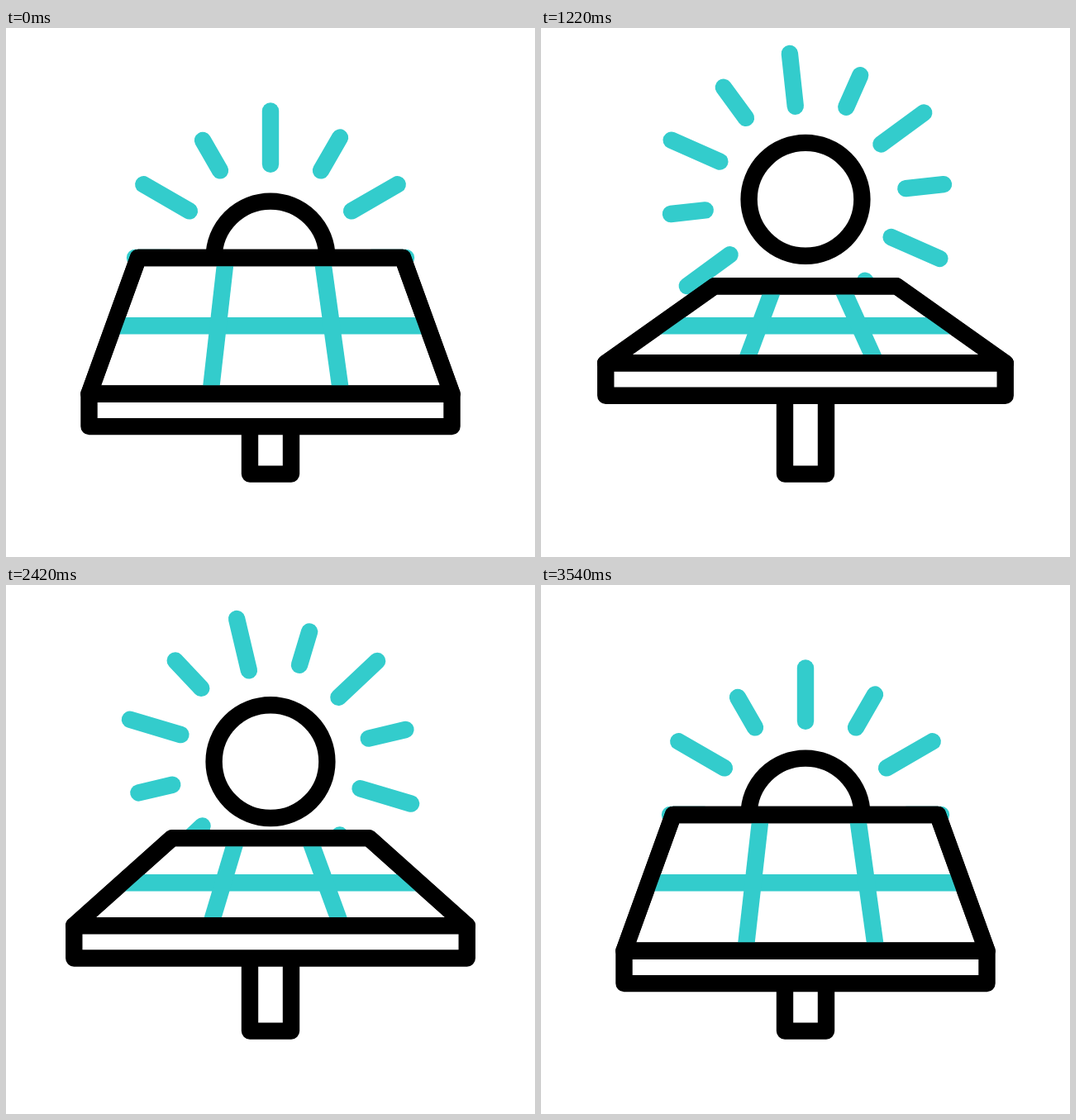
Animation, 640 px wide and 640 px high, one loop 3.6 s. Source, as an HTML page with a canvas:

```html
<!DOCTYPE html>
<html lang="en">
<head>
<meta charset="utf-8">
<title>Solar panel</title>
<style>
  html, body { margin: 0; width: 100%; height: 100%; overflow: hidden; background: #fff; }
  canvas { display: block; }
</style>
</head>
<body>
<canvas id="stage" width="640" height="640"></canvas>
<script>
const ctx = document.getElementById('stage').getContext('2d');
const LOOP = 3600, TEAL = '#33cccc', BLACK = '#000';
const mix = (a, b, k) => a + (b - a) * k;

// Cubic-bezier easing with control points (x1, 0) and (x2, 1).
function ease(t, start, end, x1, x2) {
  const x = (t - start) / (end - start);
  if (x <= 0) return 0;
  if (x >= 1) return 1;
  let lo = 0, hi = 1;
  for (let i = 0; i < 24; i++) {
    const u = (lo + hi) / 2, v = 1 - u;
    if (3 * u * v * v * x1 + 3 * u * u * v * x2 + u * u * u < x) lo = u; else hi = u;
  }
  return lo * lo * (3 - 2 * lo);
}

function shape(color, points, closed, fill) {
  ctx.beginPath();
  points.forEach(([x, y]) => ctx.lineTo(x, y));
  if (closed) ctx.closePath();
  if (fill) ctx.fill();
  ctx.strokeStyle = color;
  ctx.stroke();
}

function drawSun(y, angle) {
  ctx.save();
  ctx.translate(320, y);
  ctx.strokeStyle = BLACK;
  ctx.beginPath();
  ctx.arc(0, 0, 68.4, 0, 7);
  ctx.stroke();
  ctx.rotate(angle * Math.PI / 180);
  ctx.lineCap = 'round';
  for (let i = 0; i < 12; i++) {
    const long = i % 2 === 0;
    const outer = long ? 177.5 : i === 1 || i === 5 ? 168 : 164;
    shape(TEAL, [[0, long ? -113.3 : -122], [0, -outer]]);
    ctx.rotate(Math.PI / 6);
  }
  ctx.restore();
}

function drawPanel(p) {
  const backX = mix(160, 210.5, p), backY = mix(278, 312.7, p);
  const frontX = mix(100.5, 78, p), frontY = mix(442.8, 405, p), baseY = frontY + 39.3;
  const back = [[backX, backY], [640 - backX, backY]];
  const front = [[640 - frontX, frontY], [frontX, frontY]];
  const midY = 360.3, midX = mix(backX, frontX, (midY - backY) / (frontY - backY));

  ctx.fillStyle = '#fff';
  shape(BLACK, [[295, 420], [295, 539.6], [345, 539.6], [345, 420]]);
  shape(BLACK, [...back, ...front], true, true);
  shape(TEAL, [[midX, midY], [640 - midX, midY]]);
  shape(TEAL, [[mix(266, 282.2, p), backY], [247.3, frontY]]);
  shape(TEAL, [[mix(382.6, 363, p), backY], [405.5, frontY]]);
  shape(BLACK, [...back, ...front], true);
  shape(BLACK, [...front, [frontX, baseY], [640 - frontX, baseY]], true, true);
}

function draw(now) {
  const t = now % LOOP;
  const tilt = ease(t, 30, 1430, .32, .18) - ease(t, 2155, 3545, .32, .18);
  const rise = ease(t, 70, 1784, .415, .162) - ease(t, 2090, 3540, .36, .447);
  const spin = ease(t, 192, 1609, 1 / 3, 2 / 3) - ease(t, 1978, 3505, 1 / 3, 2 / 3);

  ctx.clearRect(0, 0, 640, 640);
  ctx.lineWidth = 20.4;
  ctx.lineJoin = 'round';
  drawSun(278 - 76 * rise, 360 * spin);
  drawPanel(tilt);
}

const begin = performance.now();
function tick() {
  draw(performance.now() - begin);
  requestAnimationFrame(tick);
}
tick();
</script>
</body>
</html>
```
